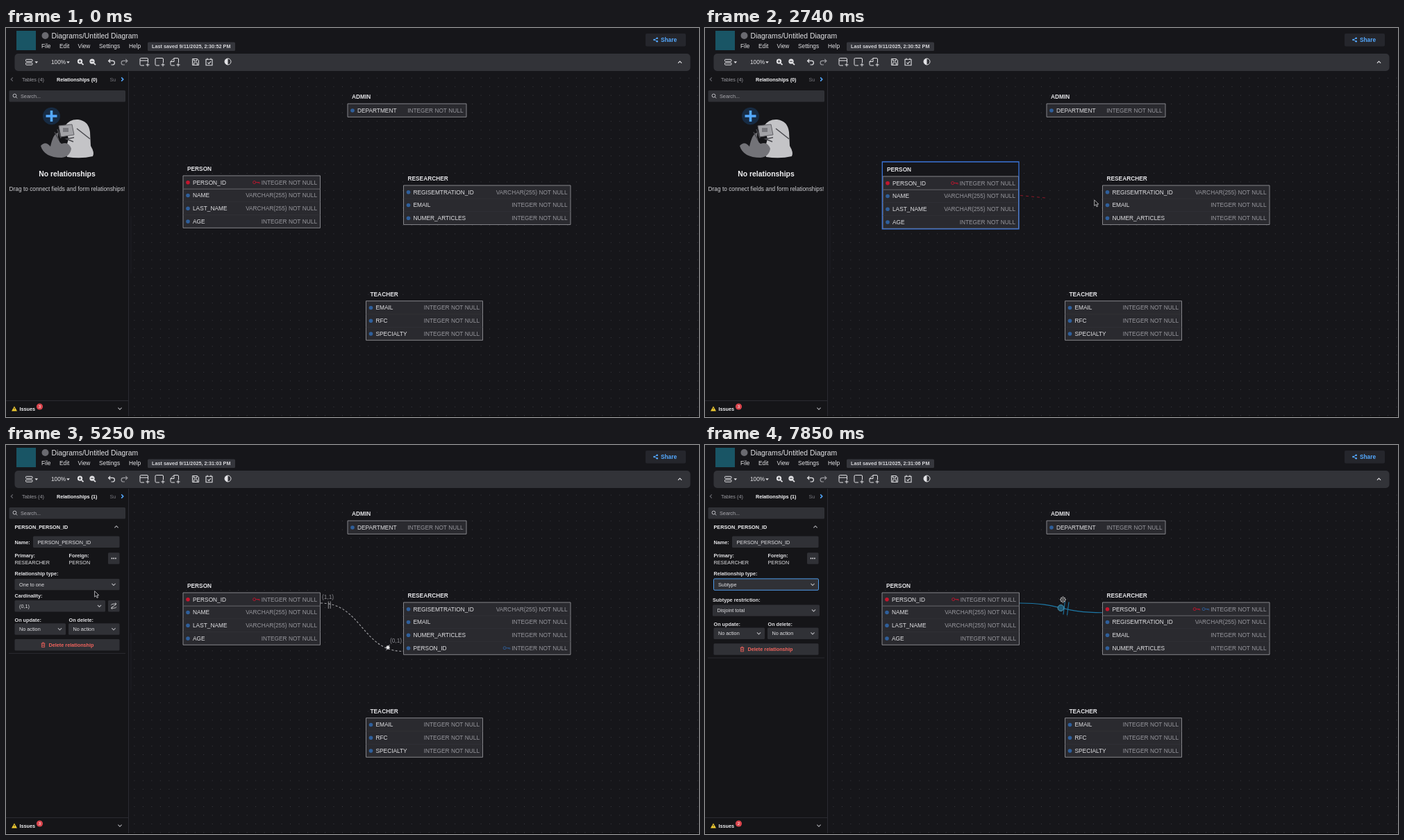
An HTML page with a canvas for the animation above (8 s loop, 998 by 561 pixels).

```html
<!DOCTYPE html>
<html lang="en">
<head>
<meta charset="utf-8">
<title>Diagram editor</title>
<style>
html, body { margin: 0; width: 100%; height: 100%; overflow: hidden; background: #16161a; }
canvas { display: block; }
</style>
</head>
<body>
<canvas id="stage" width="998" height="561"></canvas>
<script>
const c = document.getElementById('stage').getContext('2d');
const LOOP = 8000, ROW = 18.72;
const BG = '#16161a', FIELD = '#303136', LIGHT = '#e2e2e5', MUTED = '#97979d';
const BLUE = '#54a9ff', RED = '#c3162e', KEYBLUE = '#2f5f9b', EDGE = '#85858a';
const INT = 'INTEGER NOT NULL', VAR = 'VARCHAR(255) NOT NULL';

const clamp = v => Math.max(0, Math.min(1, v));
const ease = {
  both: p => p * p * (3 - 2 * p),
  in: p => p * p,
  out: p => p * (2 - p)
};

// ---- drawing helpers ----
function text(s, x, y, color = LIGHT, size = 8.32, bold = false, align = 'left') {
  c.font = `${bold ? 'bold ' : ''}${size}px "Liberation Sans", Arial, sans-serif`;
  c.textAlign = align;
  c.fillStyle = color;
  c.fillText(s, x, y + size * 0.36);
}
const small = (s, x, y, color, bold, align) => text(s, x, y, color, 7.28, bold, align);

function box(x, y, x2, y2, fill, r = 0, stroke, w = 1) {
  c.beginPath();
  c.roundRect(x, y, x2 - x, y2 - y, r);
  if (fill) { c.fillStyle = fill; c.fill(); }
  if (stroke) { c.strokeStyle = stroke; c.lineWidth = w; c.stroke(); }
}
function disc(x, y, r, fill, stroke) {
  c.beginPath();
  c.arc(x, y, r, 0, 7);
  if (fill) { c.fillStyle = fill; c.fill(); }
  if (stroke) { c.strokeStyle = stroke; c.lineWidth = 1; c.stroke(); }
}
function line(color, w, x, y, x2, y2) {
  c.beginPath();
  c.moveTo(x, y);
  c.lineTo(x2, y2);
  c.strokeStyle = color;
  c.lineWidth = w;
  c.stroke();
}
function icon(d, x, y, stroke, fill, w = 1) {
  const p = new Path2D(d);
  c.save();
  c.translate(x, y);
  if (fill) { c.fillStyle = fill; c.fill(p); }
  if (stroke) { c.strokeStyle = stroke; c.lineWidth = w; c.stroke(p); }
  c.restore();
}
const CHEVRON = {
  up: 'M-2.6 1.3L0-1.3L2.6 1.3', down: 'M-2.6-1.3L0 1.3L2.6-1.3',
  left: 'M1.3-2.6L-1.3 0L1.3 2.6', right: 'M-1.3-2.6L1.3 0L-1.3 2.6'
};
const chevron = (dir, x, y, color = '#b5b5ba', w = 1.1) => icon(CHEVRON[dir], x, y, color, null, w);
const caret = (x, y) => icon('M-2.3-1.2H2.3L0 1.6Z', x, y, null, LIGHT);
const key = (x, y, color) =>
  icon('M4 0A2 2 0 1 1 0 0A2 2 0 1 1 4 0H9.5V2M7.5 0V1.5', x, y, color, null, 0.9);

// ---- pointer ----
// start, end, x, y, easing
const MOVES = [
  [20, 650, 306, 456, 'out'],
  [870, 1170, 276.5, 257, 'both'],
  [1370, 1690, 264.5, 227, 'both'],
  [2280, 2740, 560, 248, 'in'],
  [2740, 3080, 680, 251.5, 'out'],
  [3100, 3900, 543, 288, 'both'],
  [4470, 4890, 188, 234, 'both'],
  [5070, 5390, 87, 195, 'both'],
  [5700, 6130, 86, 262, 'both'],
  [6450, 6830, 530, 316, 'both'],
  [7030, 7700, 513, 218, 'both']
];
function pointer(t) {
  let x = 420, y = 590;
  for (const [a, b, nx, ny, how] of MOVES) {
    const p = ease[how](clamp((t - a) / (b - a)));
    x += (nx - x) * p;
    y += (ny - y) * p;
  }
  return { x, y };
}
function drawPointer(t, { x, y }) {
  if (t < 20) return;
  const cross = 'M-4.5 0H4.5M0-4.5V4.5M-2-2H2V2H-2Z';
  if (t > 1000 && t < 2280 || t >= 7850) {
    if (t >= 7850) { x += 2.5; y += 5; }
    icon(cross, x, y, '#d5d5d8', null, 2.2);
    icon(cross, x, y, '#111', null, 0.8);
  } else if (t > 5390 && t < 6500) {
    icon('M-1 0Q0-1 1 0V4L4 4.6Q5 5 4.6 7L4 9.5H0L-3 6Q-3 4.6-1 6Z', x, y, '#d8d8da', '#141416', 0.8);
  } else {
    icon('M0 0V8.4L2 6.6L3.4 9.8L4.9 9.1L3.5 6H6.2Z', x, y, '#d0d0d3', '#101012', 0.8);
  }
}

// ---- tables: name, x, y, right edge, rows of [field, type, key colours] ----
const field = (name, type = INT, ...keys) => [name, type, keys];
const ADMIN = ['ADMIN', 492, 109.2, 663, [field('DEPARTMENT')]];
const PERSON = ['PERSON', 255, 213, 452.5,
  [field('PERSON_ID', INT, RED), field('NAME', VAR), field('LAST_NAME', VAR), field('AGE')]];
const TEACHER = ['TEACHER', 518.5, 393.7, 686.5, [field('EMAIL'), field('RFC'), field('SPECIALTY')]];
const OWN = [field('REGISEMTRATION_ID', VAR), field('EMAIL'), field('NUMER_ARTICLES')];
function researcher(t) {
  const rows = t < 3120 ? OWN
    : t < 6500 ? [...OWN, field('PERSON_ID', INT, KEYBLUE)]
    : [field('PERSON_ID', INT, KEYBLUE, RED), ...OWN];
  return ['RESEARCHER', 572.5, 227, 813, rows];
}

function table([name, x, y, x2, rows], m, selected) {
  const bottom = y + rows.length * ROW + 0.4;
  const over = m.x > x && m.x < x2 && m.y > y - 19 && m.y < bottom;
  if (selected) box(x, y - 20, x2 - 0.5, bottom + 1.5, BG);
  const d = selected ? 1 : 0;
  const l = x + d, r = x2 - d, top = y + d;
  box(l, top, r, bottom + d, '#2a2a2f', 0, EDGE);
  text(name, l + 6, top - 10, LIGHT, 8.32, true);
  rows.forEach(([label, type, keys], i) => {
    const cy = top + 9.6 + i * ROW;
    const hot = over && Math.abs(m.y - cy) < ROW / 2;
    const pk = keys.includes(RED);
    if (i) line(pk ? EDGE : '#34343a', 0.6, l, cy - 9.3, r, cy - 9.3);
    if (pk) line('#78787d', 1, l, cy + 9.6, r, cy + 9.6);
    disc(l + 7, cy + 0.2, 2.8, pk ? RED : KEYBLUE);
    text(label, l + 14, cy, hot ? '#85858b' : LIGHT);
    if (hot) {
      box(r - 17, cy - 6, r - 4.5, cy + 6.2, '#a9142a', 1.5);
      line('#fff', 1.2, r - 14, cy, r - 7.5, cy);
      return;
    }
    text(type, r - 4.5, cy, MUTED, 8.32, false, 'right');
    const left = r - 4.5 - c.measureText(type).width;
    keys.forEach((k, j) => key(left - 12 - j * 13, cy, k));
  });
  if (over) {
    const by = top - 16;
    box(r - 32, by, r - 19.5, by + 12.4, '#2f5c9c', 1.5);
    icon('M-3 3L-2.4 .8L1.6-3.2L3.2-1.6L-.8 2.4Z', r - 25.8, by + 6.2, null, '#fff');
    box(r - 16.5, by, r - 4, by + 12.4, '#64656a', 1.5);
    for (let i = -1; i < 2; i++) disc(r - 10.2 + i * 2.8, by + 6.2, 0.9, '#fff');
  }
  if (selected) box(x + 0.3, y - 20, x2 - 0.5, bottom + 1.5, null, 0, '#3b74d8', 1.3);
}

// ---- relationship line ----
function link(y2, color, dash) {
  c.beginPath();
  c.moveTo(453, 228);
  c.bezierCurveTo(512.5, 228, 512.5, y2, 572, y2);
  c.setLineDash(dash);
  c.strokeStyle = color;
  c.lineWidth = 1.1;
  c.stroke();
  c.setLineDash([]);
}
function relation(t) {
  if (t < 3120) return;
  const hot = t > 3860 && t < 4550 || t > 7480;
  const color = hot ? '#1d78a6' : '#a0a0a4';
  if (t < 6500) {
    link(297.5, color, [3, 2.5]);
    for (const x of [464.3, 467.2]) line(color, 0.9, x, 225.5, x, 236);
    line(color, 1, 552.5, 288, 547.5, 296);
    disc(550, 292, 2.4, '#f0f0f2', color);
    text('(1,1)', 455, 219.3, '#8d8d93');
    text('(0,1)', 553, 282.3, '#8d8d93');
  } else {
    link(241.8, color, []);
    line(color, 1.1, 518.5, 225.5, 516, 244.5);
    line(color, 1.1, 524, 226.5, 521.5, 245.5);
    disc(512.5, 235, 4.4, hot ? '#1f5874' : '#37373c', hot ? '#4f9bb8' : color);
  }
}

// ---- top bars ----
function header(t) {
  box(15, 4, 43, 32, '#195565');
  disc(56.5, 11, 5, '#6a6a70');
  text('Diagrams/Untitled Diagram', 65.5, 11, LIGHT, 10.4);
  [['File', 51], ['Edit', 77], ['View', 103.5], ['Settings', 134], ['Help', 177]]
    .forEach(([s, x]) => text(s, x, 26.5));
  box(204, 20.5, 330, 33, '#35363c', 1.5);
  const clock = t < 3200 ? '30:52' : t < 6560 ? '31:03' : '31:06';
  small(`Last saved 9/11/2025, 2:${clock} PM`, 210, 26.8, '#d4d4d8', true);

  box(921, 8, 979, 26.5, '#25262c', 2);
  line(BLUE, 0.9, 933.5, 17, 937.7, 14.7);
  line(BLUE, 0.9, 933.5, 17, 937.7, 19.3);
  for (const [x, y] of [[933.5, 17], [937.7, 14.7], [937.7, 19.3]]) disc(x, y, 1.3, BLUE);
  text('Share', 943, 17, BLUE, 8.32, true);

  box(12.5, 37, 985.5, 62, '#323338', 5);
  box(28.5, 45.3, 38, 48.3, null, 1, LIGHT);
  box(28.5, 50.2, 38, 53.2, null, 1, LIGHT);
  caret(43.8, 49.5);
  text('100%', 65, 49.2);
  caret(89.5, 49.5);
  for (const x of [106.5, 124]) {
    disc(x, 48.2, 3.6, LIGHT);
    line(LIGHT, 1.8, x + 2.6, 50.8, x + 5, 53.2);
    line('#323338', 1, x - 1.8, 48.2, x + 1.8, 48.2);
    if (x < 110) line('#323338', 1, x, 46.4, x, 50);
  }
  icon('M-1.8-4.2L-4.4-1.6L-1.8 1M-4.4-1.6H1.5Q4.4-1.6 4.4 1.2T1.5 4H-.5', 152, 49, LIGHT, null, 1.2);
  icon('M1.8-4.2L4.4-1.6L1.8 1M4.4-1.6H-1.5Q-4.4-1.6-4.4 1.2T-1.5 4H.5', 170.5, 49, '#99999e', null, 1.2);
  [199, 221, 243].forEach((x, i) => {
    const shape = i < 2 ? 'M0 5H-4.5Q-6 5-6 3.5V-4Q-6-5.5-4.5-5.5H4Q5.5-5.5 5.5-4V1'
      : 'M0 5H-4.5Q-6 5-6 3.5V-.5L-1-5.5H4Q5.5-5.5 5.5-4V1M-1-5.5V-.5H-6';
    icon(shape + (i ? '' : 'M-6-2H5.5') + 'M2.5 4H7.5M5 1.5V6.5', x, 49, LIGHT);
  });
  icon('M-4.5-4.5H2.5L4.5-2.5V4.5H-4.5ZM-2.5-4.5V-1.5H2V-4.5M-2.5 4.5V1H2.5V4.5', 273, 49, LIGHT);
  icon('M-4.5-3.8H4.5V4.7H-4.5ZM-2.5-5.5V-3M2.5-5.5V-3M-2 .8L-.3 2.5L2.5-.8', 292.5, 49, LIGHT, null, 1.1);
  disc(319.5, 48.5, 4.5, null, LIGHT);
  icon('M0-4.5A4.5 4.5 0 0 0 0 4.5Z', 319.5, 48.5, null, LIGHT);
  chevron('up', 970.5, 49.3, LIGHT);
}

// ---- side panel ----
function emptyState() {
  icon('M85 141Q92 131 104 132Q119 134 121 150L122 170Q128 180 125 185Q108 189 88 186Q85 175 90 160Z', 0, 0, null, '#c4c4c7');
  icon('M50 170Q57 162 64 171Q68 152 75 151Q74 163 80 167Q90 163 94 174Q92 186 80 187Q55 187 50 170Z', 0, 0, null, '#737378');
  icon('M76 141L95 139L98 154L79 157Z', 0, 0, '#606065', '#a3a3a7');
  box(82, 144, 90, 150, '#77777c');
  icon('M70 150L76 161M74 146L79 159M98 158L87 160L97 164M102 145L121 160', 0, 0, '#48484d', null, 1.5);
  disc(65.5, 127, 12.5, '#172b43');
  icon('M-8 0H8M0-8V8', 65.5, 127, BLUE, null, 3.6);
  text('No relationships', 88, 210.5, '#f2f2f4', 10.4, true, 'center');
  text('Drag to connect fields and form relationships!', 88, 232, '#d0d0d4', 8.32, false, 'center');
}
function select(s, x, y, x2, focus) {
  box(x, y, x2, y + 16.4, FIELD, 1.5, focus && BLUE, 0.9);
  small(s, x + 6.5, y + 8.2);
  chevron('down', x2 - 8.5, y + 8.2);
}
const label = (s, x, y) => small(s, x, y, LIGHT, true);

function form(t) {
  const subtype = t >= 6500;
  label('Name:', 12.5, 140);
  box(39, 131.6, 163.5, 148, FIELD, 1.5);
  small('PERSON_PERSON_ID', 45.5, 140);
  label('Primary:', 12.5, 159);
  label('Foreign:', 90.5, 159);
  small('RESEARCHER', 12.5, 169.3);
  small('PERSON', 90.5, 169.3);
  box(147, 155.3, 163.5, 171.7, FIELD, 1.5);
  for (let i = -1; i < 2; i++) disc(155.2 + i * 2.7, 163.5, 0.9, LIGHT);
  label('Relationship type:', 12.5, 185.8);
  select(subtype ? 'Subtype' : 'One to one', 12.5, 192.9, 163.5, t >= 5560);
  let d = 0;
  if (subtype) {
    d = 6.2;
    label('Subtype restriction:', 11, 223.3);
    select('Disjoint total', 11, 230.4, 165);
  } else {
    label('Cardinality:', 12.5, 217);
    select('(0,1)', 12.5, 224, 143);
    box(147, 224, 163.5, 240.4, FIELD, 1.5);
    icon('M-4-1.2Q-3-3 0-3H3.5M2-4.5L3.8-3L2-1.5M4 1.2Q3 3 0 3H-3.5M-2 1.5L-3.8 3L-2 4.5M-3 2L3-2', 155.2, 232.2, LIGHT, null, 0.8);
  }
  label('On update:', 12.5, 252.3 + d);
  label('On delete:', 90.5, 252.3 + d);
  select('No action', 12.5, 257.3 + d, 86);
  select('No action', 90, 257.3 + d, 163.5);
  box(12.5, 280 + d, 163.5, 296.5 + d, FIELD, 1.5);
  const bad = '#f0635c';
  icon('M-2.8-2H2.8M-1-2V-3.3H1V-2M-2.1-2V3.4H2.1V-2M-.7-.5V2M.7-.5V2', 53.5, 288.2 + d, bad, null, 0.8);
  small('Delete relationship', 61.5, 288.2 + d, bad, true);
}
function dropdown(t, m) {
  if (t < 5560 || t > 6485) return;
  const q = clamp((t - 6425) / 60);
  const p = ease.out(clamp((t - 5540) / 150));
  const s = t < 6430 ? 0.8 + 0.2 * p : 1 - 0.5 * q;
  c.save();
  c.globalAlpha = t < 6430 ? p : 0.45 * (1 - q);
  c.translate(88, 209);
  c.scale(s, s);
  c.translate(-88, -209);
  box(12.5, 211.5, 163.5, 272, '#3b3c42', 2.5);
  ['One to one', 'One to many', 'Subtype'].forEach((o, i) => {
    const y = 223.3 + i * ROW;
    if (t < 6430 && Math.abs(m.y - y) < ROW / 2) box(12.5, y - 9.3, 163.5, y + 9.3, '#4a4b51');
    if (!i) icon('M-2.5 0L-.7 1.9L2.8-2', 20, y, LIGHT);
    small(o, 30, y);
  });
  c.restore();
}
function sidebar(t, m) {
  box(0, 63, 176.5, 561, '#151518');
  line('#2b2b31', 1, 176.5, 63, 176.5, 561);
  line('#1f1f24', 1.2, 180, 271, 180, 354);
  const count = t < 3120 ? 0 : 1;
  chevron('left', 8.5, 74, '#68686e');
  small('Tables (4)', 23, 74, '#9a9aa0');
  small(`Relationships (${count})`, 73, 74, '#f4f4f6', true);
  small('Su', 149.5, 74, '#77777d');
  chevron('right', 167.5, 74, BLUE, 1.5);
  box(4.5, 90, 172, 106.6, FIELD, 1.5);
  disc(12.5, 97.6, 2.4, null, '#c0c0c5');
  line('#c0c0c5', 1, 14.3, 99.4, 16.2, 101.3);
  small('Search...', 21, 98.5, '#a8a8ad');

  if (!count) emptyState();
  else {
    small('PERSON_PERSON_ID', 12.5, 118, '#f0f0f2', true);
    chevron('up', 159, 118);
    const open = ease.both(clamp((t - 4470) / 240));
    const end = 129.5 + (t < 6500 ? 171 : 177.5) * open;
    c.save();
    c.beginPath();
    c.rect(0, 126, 176, end - 126);
    c.clip();
    c.globalAlpha = open;
    if (open) form(t);
    c.restore();
    line('#29292e', 1, 4, end, 172, end);
    dropdown(t, m);
  }

  line('#2b2b31', 1, 0, 537.5, 176, 537.5);
  icon('M0-3.8L4 3.2H-4Z', 12, 549.2, null, '#f2cd31');
  line('#222', 0.9, 12, 547.8, 12, 550.2);
  small('Issues', 19.5, 549, '#f0f0f2', true);
  disc(48.5, 546, 4.6, '#d9444c');
  text(t < 6560 ? '3' : '2', 48.5, 546, '#fff', 6.2, false, 'center');
  chevron('down', 164, 549);
}

function grid() {
  c.fillStyle = '#3d3d43';
  for (let x = 184.9; x < 998; x += 12.48)
    for (let y = 72.2; y < 560; y += 12.48) c.fillRect(x - 0.5, y - 0.5, 1, 1);
}

function draw(t) {
  const m = pointer(t);
  box(0, 0, 998, 561, BG);
  grid();
  if (t >= 2280 && t < 3100) {
    const tail = pointer(t - 58);
    c.setLineDash([4, 4]);
    line('#8d1829', 1, 263, 223, tail.x, tail.y + 2);
    c.setLineDash([]);
  }
  relation(t);
  table(ADMIN, m);
  table(PERSON, m, t >= 2140 && t < 3100);
  table(researcher(t), m);
  table(TEACHER, m);
  header(t);
  sidebar(t, m);
  box(0, 560, 998, 561, '#050506');
  drawPointer(t, m);
}

const start = performance.now();
function tick() {
  draw((performance.now() - start) % LOOP);
  requestAnimationFrame(tick);
}
tick();
</script>
</body>
</html>
```
